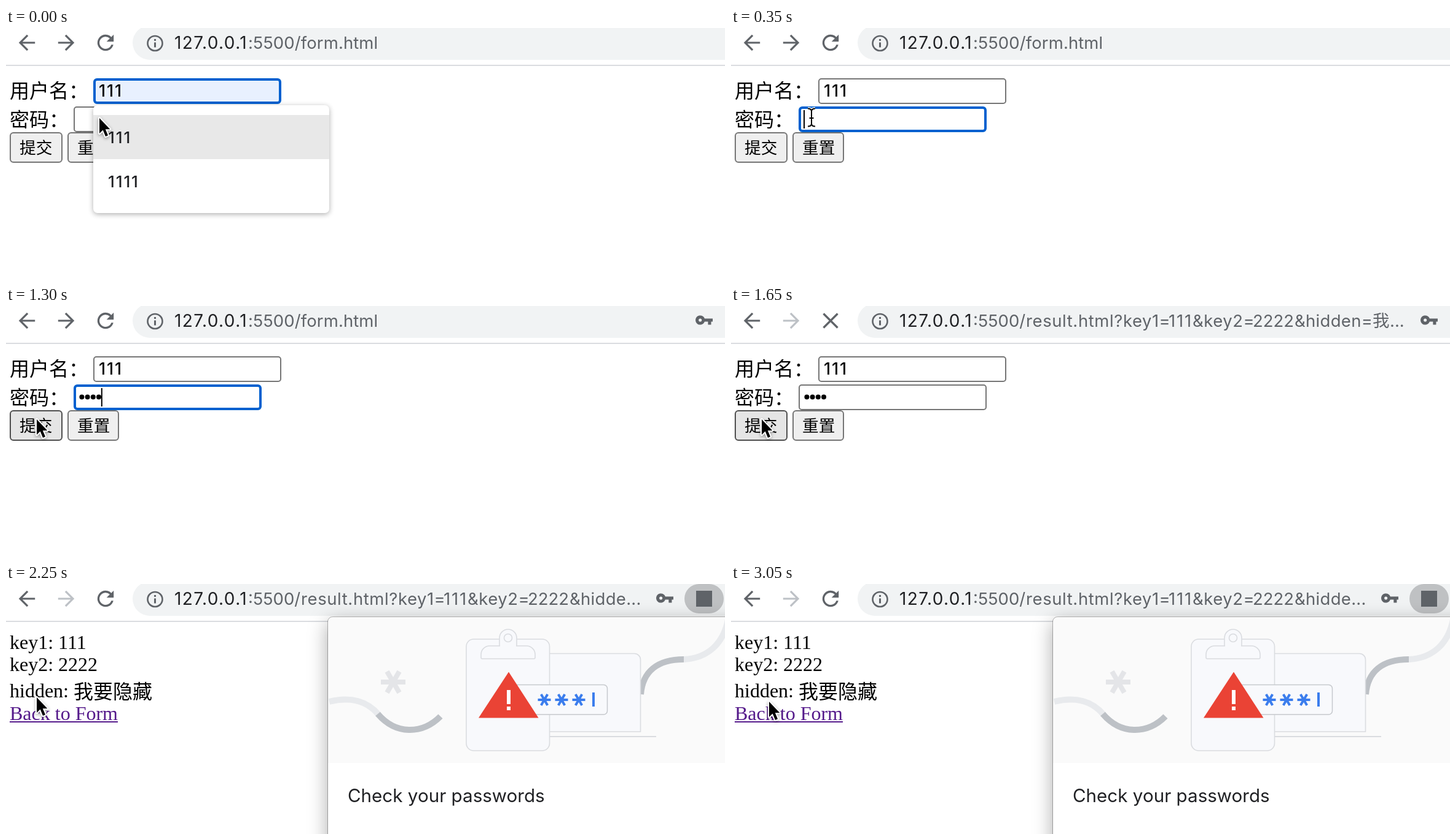
Recreate the animation shown at these times as an HTML page with a canvas. Size 1170 by 408 pixels, loop 3.25 s.

```html
<!DOCTYPE html>
<html lang="zh">
<head>
<meta charset="utf-8">
<title>Form demo</title>
<style>
  html, body { margin: 0; width: 100%; height: 100%; overflow: hidden; background: #fff; }
  canvas { display: block; width: 100%; height: 100%; }
</style>
</head>
<body>
<canvas id="stage" width="1170" height="408"></canvas>
<script>
const ctx = document.getElementById('stage').getContext('2d');
const LOOP = 3250, STEP = 50;
const SANS = 'Inter, "Noto Sans CJK SC", "Noto Sans CJK", sans-serif';
const SERIF = '"Liberation Serif", "Noto Sans CJK SC", "Noto Sans CJK", serif';
const INK = '#202124', GREY = '#5f6368', PALE = '#dadce0', BLUE = '#1a73e8';

const BACK = new Path2D('M20 11.1H7.6l5.75-5.75L12 4l-8 8 8 8 1.35-1.35L7.6 12.9H20z');
const RELOAD = new Path2D('M17.65 6.35A8 8 0 1 0 19.73 14h-2.08A6 6 0 1 1 16.22 7.78L13 11h7V4z');
const KEY = new Path2D('M12.65 10A6 6 0 1 0 12.65 14H17v4h4v-4h2v-4zM7 14a2 2 0 1 1 0-4 2 2 0 0 1 0 4z');
const ARROW = new Path2D('M0 0V25L5.7 19.6 10 30 14 28.3 9.8 18.2H17.3z');
const IBEAM = new Path2D('M-6-14.5Q0-14.5 0-10Q0-14.5 6-14.5M0-10V10M-6 14.5Q0 14.5 0 10Q0 14.5 6 14.5M-3.5 1H3.5');

// Pointer stops: time, x, y
const STOPS = [[0, 152, 147], [50, 152, 147], [200, 131, 146], [900, 131, 146],
  [1000, 100, 166], [1300, 50, 185], [2550, 50, 185], [2800, 62, 192], [LOOP, 62, 192]];

function text(str, x, y, size, color = '#000', weight = 400, family = SANS, spacing = 0) {
  ctx.font = `${weight} ${size}px ${family}`;
  ctx.letterSpacing = `${spacing}px`;
  ctx.fillStyle = color;
  ctx.fillText(str, x, y);
}

function box(x, y, w, h, r, fill, stroke, line = 2) {
  ctx.beginPath();
  ctx.roundRect(x, y, w, h, r);
  if (fill) { ctx.fillStyle = fill; ctx.fill(); }
  if (stroke) { ctx.strokeStyle = stroke; ctx.lineWidth = line; ctx.stroke(); }
}

function rect(x, y, w, h, color) {
  ctx.fillStyle = color;
  ctx.fillRect(x, y, w, h);
}

function dot(x, y, r, color) {
  ctx.fillStyle = color;
  ctx.beginPath();
  ctx.arc(x, y, r, 0, 7);
  ctx.fill();
}

function line(d, color, width) {
  ctx.strokeStyle = color;
  ctx.lineWidth = width;
  ctx.stroke(new Path2D(d));
}

function glyph(path, x, y, scale, color, flip = 1) {
  ctx.save();
  ctx.translate(x, y);
  ctx.scale(scale * flip, scale);
  ctx.translate(-12, -12);
  ctx.fillStyle = color;
  ctx.fill(path);
  ctx.restore();
}

function panel(x, y, w, h, r, blur, shade) {
  ctx.save();
  ctx.shadowColor = `rgba(0,0,0,${shade})`;
  ctx.shadowBlur = blur;
  ctx.shadowOffsetY = blur / 4;
  box(x, y, w, h, r, '#fff');
  ctx.restore();
}

function star(x, y, r, width, color) {
  ctx.strokeStyle = color;
  ctx.lineWidth = width;
  ctx.beginPath();
  for (let i = 0; i < 3; i++) {
    const a = i * Math.PI / 3, dx = r * Math.cos(a), dy = r * Math.sin(a);
    ctx.moveTo(x - dx, y - dy);
    ctx.lineTo(x + dx, y + dy);
  }
  ctx.stroke();
}

function toolbar(t) {
  const sent = t >= 1600, loaded = t >= 1700, translate = t >= 1750;
  rect(0, 60, 1170, 2, PALE);
  box(206, -4, 1000, 56, 28, '#f1f3f4');
  glyph(BACK, 34, 24, 1.65, GREY);
  glyph(BACK, 98, 24, 1.65, sent ? '#bdc1c6' : GREY, -1);
  if (sent && !loaded) line('M150.5 12.5L173.5 35.5M173.5 12.5L150.5 35.5', GREY, 3.2);
  else glyph(RELOAD, 162, 24, 1.65, GREY);

  ctx.strokeStyle = GREY;
  ctx.lineWidth = 2.6;
  ctx.beginPath();
  ctx.arc(242.5, 25, 12, 0, 7);
  ctx.stroke();
  rect(241, 18, 3, 3, GREY);
  rect(241, 23.5, 3, 8, GREY);

  const part = (str, x, spacing = 0) => text(str, x, 34, 27.5, GREY, 400, SANS, spacing);
  text('127.0.0.1', 274, 34, 28, INK, 400, SANS, 1.4);
  if (!sent) part(':5500/form.html', 394, 0.1);
  else {
    part(':5500/', 394);
    part('result.html?', 480, 0.6);
    part('key1=', 638, 0.5);
    part('111', 712, 1.8);
    part('&key2=', 751, 0.5);
    part('2222', 849);
    part(translate ? '&hidde...' : '&hidden=', 917, 0.3);
    if (!translate) { part('我', 1044); part('...', 1072); }
  }
  if (t >= 500) glyph(KEY, translate ? 1072 : 1136, 23, 1.27, GREY);
  if (translate) {
    box(1104, 0, 64, 48, 24, '#bfc1c3');
    rect(1123, 11, 26, 26, GREY);
  }
}

function field(x, y, focus, fill) {
  if (focus) box(x + 2, y + 2, 302, 38, 4, fill, '#0060cf', 4);
  else box(x + 1, y + 1, 304, 40, 4, fill, '#767676');
}

function button(label, x, w, fill = '#efefef', edge = '#767676') {
  box(x + 1, 171, w - 2, 48, 5, fill, edge);
  text(label, x + 16, 205, 26.67, '#000', 500);
}

function form(t) {
  const picking = t < 200, focus = t >= 200 && t < 1450;
  const typed = [500, 700, 900, 1100].filter(k => t >= k).length;
  text('用户名：', 6, 114, 32, '#000', 400, SERIF);
  text('密码：', 6, 161, 32, '#000', 400, SERIF);
  field(142, 82, picking, picking ? '#e8f0fe' : '#fff');
  text('111', 151, 112, 26.67, '#000', 500, SANS, 1.9);
  field(110, 128, focus, '#fff');
  for (let i = 0; i < typed; i++) dot(123.4 + 9.2 * i, 148.5, 4, '#000');
  if (focus) rect(118 + 9.2 * typed, 134, 2, 30, '#000');
  const over = t >= 1150, down = t >= 1450 && t < 1550;
  button('提交', 6, 86, down ? '#f5f5f5' : over ? '#e5e5e5' : '#efefef', over && !down ? '#4f4f4f' : '#767676');
  button('重置', 100, 84);
}

function suggestions(alpha) {
  if (alpha <= 0) return;
  ctx.globalAlpha = alpha;
  panel(142, 126, 384, 176, 7, 8, 0.32);
  rect(142, 142, 384, 72, '#e8e8e8');
  text('111', 166, 188, 26, INK, 500, SANS, 1.9);
  text('1111', 166, 260, 26, INK, 500, SANS, 1.9);
  ctx.globalAlpha = 1;
}

function result() {
  const row = (str, y, color) => text(str, 6, y, 32, color, 400, SERIF);
  row('key1: 111', 106);
  row('key2: 2222', 142);
  row('hidden: ', 185);
  text('我要隐藏', 110, 187, 32, '#000', 400, SERIF);
  row('Back to Form', 222, '#551a8b');
  rect(6, 224, 176, 2, '#551a8b');
}

function translatePopup(alpha) {
  ctx.globalAlpha = Math.min(1, alpha);
  panel(570, 52, 640, 188, 7, 32, 0.32);
  box(570, 147, 640, 93, [0, 0, 7, 7], '#f2f2f2');
  rect(570, 146, 640, 2, PALE);
  box(569.5, 51.5, 641, 189, 7, null, 'rgba(0,0,0,.27)', 1);
  text('English', 642, 106, 24, BLUE, 500);
  text('Chinese (Simplified)', 808, 106, 24, GREY, 500);
  rect(768, 128, 316, 2, PALE);
  rect(602, 126, 166, 4, BLUE);
  for (const y of [88, 98, 108]) dot(1124, y, 3, GREY);
  text('Bramlo', 602, 202, 25, '#6b6e72', 700, 'Lato, sans-serif');
  text('Translate', 687, 202, 23, '#6b6e72', 400, 'Lato, sans-serif');
  ctx.globalAlpha = 1;
}

function passwordPopup() {
  const edge = '#dadce0', tint = '#f8f9fc';
  panel(524, 54, 700, 420, 8, 32, 0.34);
  box(524, 54, 700, 238, [8, 8, 0, 0], '#fafafa');
  box(523.5, 53.5, 701, 421, 8, null, 'rgba(0,0,0,.27)', 1);

  line('M526 192C562 183 589 192 606 213', '#e8eaed', 10);
  line('M605 212C634 246 677 246 707 216', '#bdc1c6', 10);
  line('M1103 123C1145 121 1168 94 1175 58', '#e8eaed', 10);
  line('M1033 180C1036 143 1060 123 1103 123', '#bdc1c6', 10);
  star(630, 160, 20, 8, '#e4e5e8');

  box(860, 113.5, 172.5, 127.5, [0, 10, 0, 0], tint, edge, 1.6);
  line('M884 249H1058', edge, 1.8);
  box(749, 90, 135.5, 182, 12, tint, edge, 1.6);
  ctx.fillStyle = tint;
  ctx.fill(new Path2D('M803 101V88A14 14 0 0 1 831 88V101z'));
  line('M803 101V88A14 14 0 0 1 831 88V101', edge, 1.6);
  box(773, 101, 88, 21, [14, 14, 2, 2], tint, edge, 1.6);
  rect(804, 99, 26, 4, tint);
  ctx.beginPath();
  ctx.arc(817, 88, 6.5, 0, 7);
  ctx.stroke();

  box(810, 164.5, 168.5, 48.5, 6, tint, '#c6c9cd', 1.5);
  for (const x of [876, 904, 932]) star(x, 189, 10.5, 4, '#3b7ded');
  rect(954, 177, 4, 23, '#3b7ded');
  ctx.fillStyle = '#ea4335';
  ctx.fill(new Path2D('M818 143.5L866.5 218.5H769z'));
  rect(815, 173, 6, 23, '#fff');
  rect(815, 200, 6, 6, '#fff');
  text('Check your passwords', 556, 356, 29.6, INK);
}

function pointer(t) {
  if (t >= 500 && t < 900) return;
  const i = STOPS.findIndex((s, n) => n && t <= s[0]);
  const [t0, x0, y0] = STOPS[i - 1], [t1, x1, y1] = STOPS[i];
  const p = (t - t0) / (t1 - t0), e = i === 5 ? 1 - (1 - p) ** 2 : p;
  ctx.save();
  ctx.translate(x0 + (x1 - x0) * e, y0 + (y1 - y0) * e);
  ctx.lineJoin = 'round';
  ctx.strokeStyle = '#fff';
  if (t >= 150 && t < 1100) {
    ctx.lineWidth = 5;
    ctx.stroke(IBEAM);
    ctx.strokeStyle = '#000';
    ctx.lineWidth = 2;
    ctx.stroke(IBEAM);
  } else {
    ctx.save();
    ctx.shadowColor = 'rgba(0,0,0,.35)';
    ctx.shadowBlur = 5;
    ctx.shadowOffsetY = 2;
    ctx.lineWidth = 4;
    ctx.stroke(ARROW);
    ctx.restore();
    ctx.fillStyle = '#000';
    ctx.fill(ARROW);
  }
  ctx.restore();
}

function draw(now) {
  const t = Math.floor((now % LOOP) / STEP) * STEP;
  rect(0, 0, 1170, 408, '#fff');
  toolbar(t);
  if (t < 1700) {
    form(t);
    suggestions(Math.min(1, (350 - t) / 200));
  } else {
    result();
    if (t >= 2250) passwordPopup();
    else if (t >= 1750) translatePopup((t - 1700) / 150);
  }
  pointer(t);
}

const start = performance.now();
function tick() {
  draw(performance.now() - start);
  requestAnimationFrame(tick);
}
tick();
</script>
</body>
</html>
```
